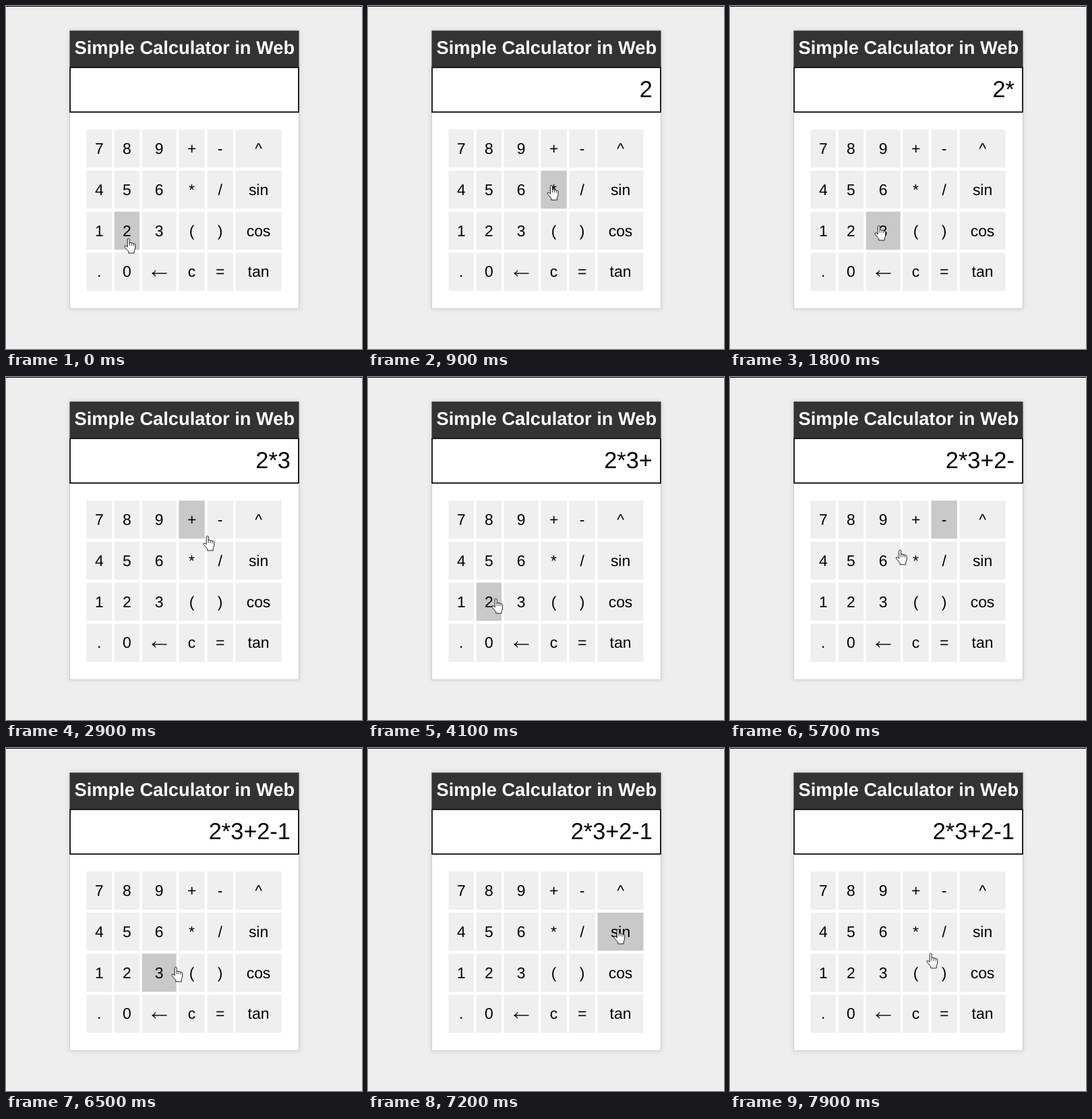
These frames come from a looping animation (528 px wide and 508 px high, 8000 ms). An HTML page with a canvas:

```html
<!DOCTYPE html>
<html lang="en">
<head>
<meta charset="utf-8">
<title>Simple Calculator in Web</title>
<style>
  html, body { margin: 0; width: 100%; height: 100%; overflow: hidden; background: #eee; }
  canvas { display: block; }
</style>
</head>
<body>
<canvas id="stage" width="528" height="508"></canvas>
<script>
const ctx = document.getElementById('stage').getContext('2d');
const FONT = '"Liberation Sans", Arial, sans-serif';
const LOOP = 8000, STEP = 100;

// Button grid, laid out from column widths and a fixed row pitch
const WIDTHS = [37.5, 37.5, 51, 38.5, 38.5, 68], GAP = 3.6;
const LABELS = ['7 8 9 + - ^', '4 5 6 * / sin', '1 2 3 ( ) cos', '. 0 ← c = tan'];
const buttons = LABELS.flatMap((row, r) => {
  let x = 119.5;
  return row.split(' ').map((label, c) => {
    const button = { label, x, y: 183 + 60.8 * r, w: WIDTHS[c], h: 56.4 };
    x += WIDTHS[c] + GAP;
    return button;
  });
});

// Pointer moves: start, end, fingertip target, and the key pressed on leaving
const START = [181, 344];
const MOVES = [
  [500, 1000, 275, 262, '2'],
  [1300, 1800, 220, 325, '*'],
  [2000, 2800, 284, 222, '3'],
  [2800, 2900, 298, 235],
  [2900, 3100, 275, 215],
  [3300, 3800, 196, 324, '+'],
  [4000, 4100, 189, 328],
  [4700, 5000, 315, 264, '2'],
  [5000, 5500, 317, 208],
  [5600, 6100, 135, 341, '-'],
  [6300, 6500, 251, 324, '1'],
  [6500, 7100, 370, 268],
  [7200, 7600, 285, 275],
  [7600, 7900, 297, 304]
];

const hand = new Path2D('M5 2Q5 .5 6.5 .5Q8 .5 8 2V7.5Q8 6.3 9.5 6.3Q11 6.3 11 7.8' +
  'Q11 7 12.3 7Q13.8 7 13.8 8.5Q14 8 15 8Q16.5 8 16.5 9.8V14Q16.5 16 15 18.5V22' +
  'H6.5V19.5L1.2 13.5Q0 11.8 1.3 11Q2.6 10.3 5 13Z');
const knuckles = new Path2D('M8 7.5V11M11 7.8V11M13.8 8.5V11.5');
const arrow = new Path2D('M11 0H-10.5M-5.5 -4.5Q-7 -1.5 -10.5 0Q-7 1.5 -5.5 4.5');

const easeOut = p => 1 - (1 - p) ** 2;

function pointerAt(t) {
  let [x, y] = START;
  for (const [from, to, tx, ty] of MOVES) {
    if (t <= from) break;
    const p = easeOut(Math.min(1, (t - from) / (to - from)));
    x += (tx - x) * p;
    y += (ty - y) * p;
  }
  return [x, y];
}

const typedAt = t => MOVES.map(([from, , , , key]) => key && from <= t ? key : '').join('');

function box(color, x, y, w, h) {
  ctx.fillStyle = color;
  ctx.fillRect(x, y, w, h);
}

function text(str, x, y, size, align, color = '#000', weight = '') {
  ctx.font = `${weight} ${size}px ${FONT}`;
  ctx.textRendering = 'geometricPrecision';
  ctx.textAlign = align;
  ctx.fillStyle = color;
  ctx.fillText(str, x, y);
}

// Outline a path at a place, filled first if a fill is given
function ink(path, x, y, width, fill) {
  ctx.save();
  ctx.translate(x, y);
  ctx.lineWidth = width;
  ctx.lineJoin = 'round';
  ctx.strokeStyle = '#111';
  if (fill) {
    ctx.fillStyle = fill;
    ctx.fill(path);
  }
  ctx.stroke(path);
  ctx.restore();
}

function drawCard() {
  box('#eee', 0, 0, 528, 508);
  box('#000', 0, 0, 528, 1);
  ctx.shadowColor = 'rgba(0,0,0,.12)';
  ctx.shadowBlur = 7;
  box('#ccc', 94, 36, 341, 412.5);
  ctx.shadowColor = 'transparent';
  box('#fff', 95, 37, 339, 410.7);
  box('#333', 94.5, 36.5, 340, 54);
  box('#000', 94.2, 90.2, 340.6, 67.7);
  box('#fff', 95.9, 91.9, 337.2, 64.3);
  text('Simple Calculator in Web', 264.8, 71.4, 27.25, 'center', '#fff', 'bold');
}

function drawButton({ label, x, y, w, h }, [px, py]) {
  const over = px >= x && px <= x + w && py >= y && py <= y + h;
  box(over ? '#c9c9c9' : '#efefef', x, y, w, h);
  if (label === '←') ink(arrow, x + w / 2 + 0.3, y + 30.6, 1.4);
  else text(label, x + w / 2, y + 36, 22.86, 'center');
}

function draw(t) {
  drawCard();
  text(typedAt(t), 421.8, 134.8, 34.29, 'right');
  // The hover colour trails the pointer by one step
  const hot = pointerAt(t - STEP);
  buttons.forEach(b => drawButton(b, hot));
  const [x, y] = pointerAt(t);
  ink(hand, x - 5.8, y, 0.95, '#fff');
  ink(knuckles, x - 5.8, y, 0.8);
}

function tick(now) {
  draw(Math.floor((now % LOOP) / STEP) * STEP);
  requestAnimationFrame(tick);
}
requestAnimationFrame(tick);
</script>
</body>
</html>
```
